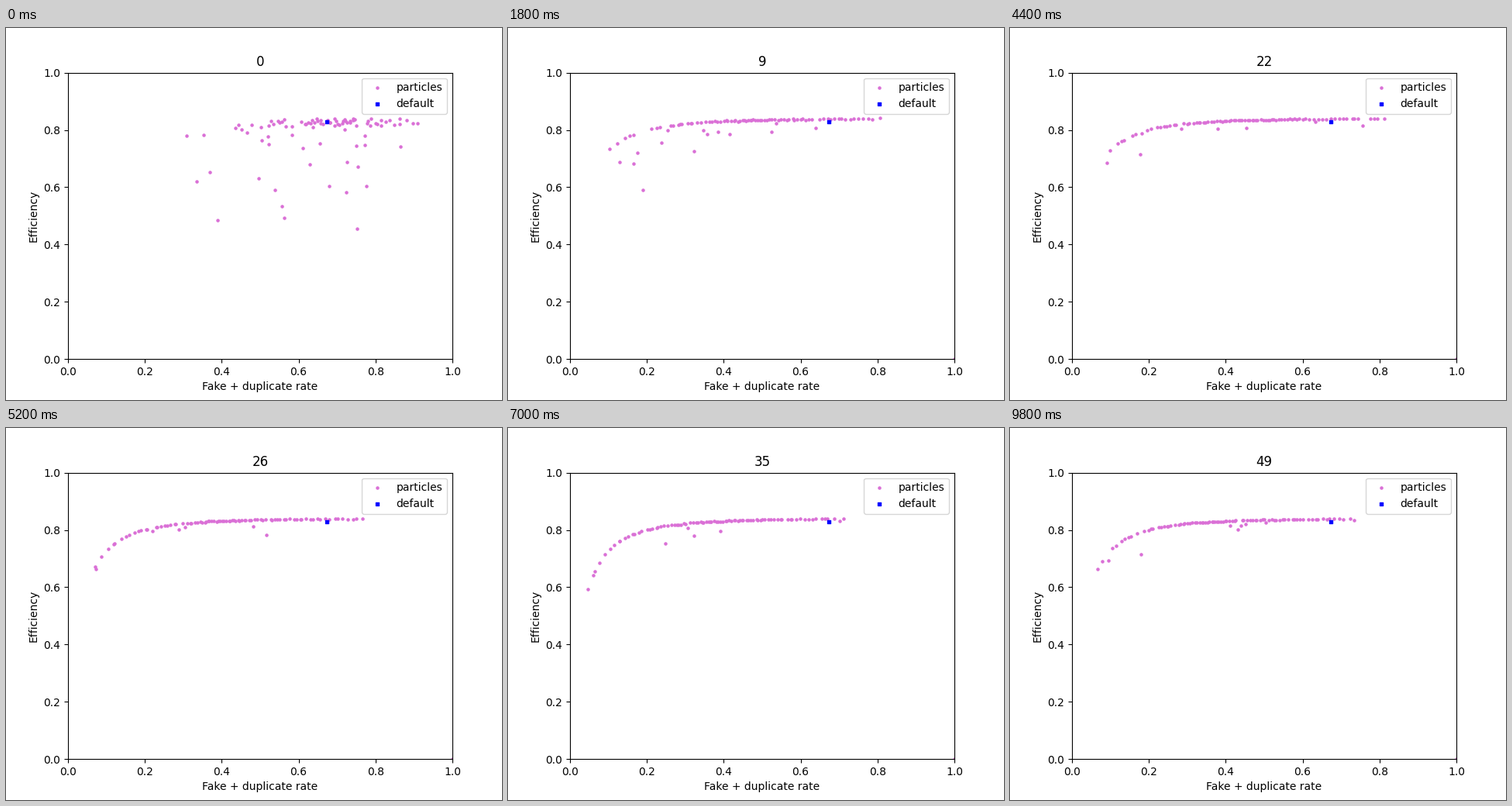
These frames come from a looping animation (640 by 480 pixels, 10000 ms). A matplotlib script:

```python
import numpy as np
import matplotlib.pyplot as plt
from matplotlib.animation import FuncAnimation

FRAMES, STEP_MS, COUNT = 50, 200, 90

# where the swarm sits along the front as the iterations pass
STAGE = [0, 4, 14, 22, 31, 49]
CENTRE = [.70, .44, .47, .45, .37, .40]
REACH = [.21, .365, .34, .37, .34, .34]


def front(x):
    """Best efficiency reachable at rate x."""
    return .842 - 1.37 * np.exp(-7.9 * np.sqrt(x))


def swarm(i):
    rng = np.random.default_rng(20 + i)

    # evenly ranked places, denser towards the middle
    v = 2 * (np.arange(COUNT) + rng.uniform(0, 1, COUNT)) / COUNT - 1
    x = np.interp(i, STAGE, CENTRE) + np.interp(i, STAGE, REACH) * (.65 * v + .35 * v**3)

    # loose particles lag to the left and below, fewer of them with time
    share = .05 + .3 * np.exp(-i / 8)
    pull = 1 + 3 * np.exp(-x / .15)
    loose = rng.uniform(0, 1, COUNT) < share * pull
    x -= loose * rng.exponential(.1 * np.exp(-i / 3), COUNT)
    x = np.clip(x, .02, .92)

    depth = (.015 + .09 * np.exp(-i / 6)) * pull
    thickness = .003 + .025 * np.exp(-i / 3)
    y = front(x) - thickness * rng.uniform(0, 1, COUNT)
    y -= loose * depth * rng.exponential(1, COUNT)
    points = np.column_stack([x, np.maximum(y, .2)])

    # after the first step a failed particle rests in the corner
    return np.vstack([points, (1, 0)]) if i else points


fig, ax = plt.subplots(figsize=(6.4, 4.8), dpi=100)
particles = ax.scatter([], [], s=5, color="orchid", label="particles")
ax.scatter([.674], [.829], s=5, marker="s", color="blue", label="default")
ax.set(xlim=(0, 1), ylim=(0, 1), xlabel="Fake + duplicate rate", ylabel="Efficiency")
ax.legend(loc="upper right")
title = ax.set_title("0")


def draw(i):
    particles.set_offsets(swarm(i))
    title.set_text(str(i))
    return particles, title


anim = FuncAnimation(fig, draw, frames=FRAMES, interval=STEP_MS, repeat=True,
                     repeat_delay=0, blit=False)
plt.show()
```
